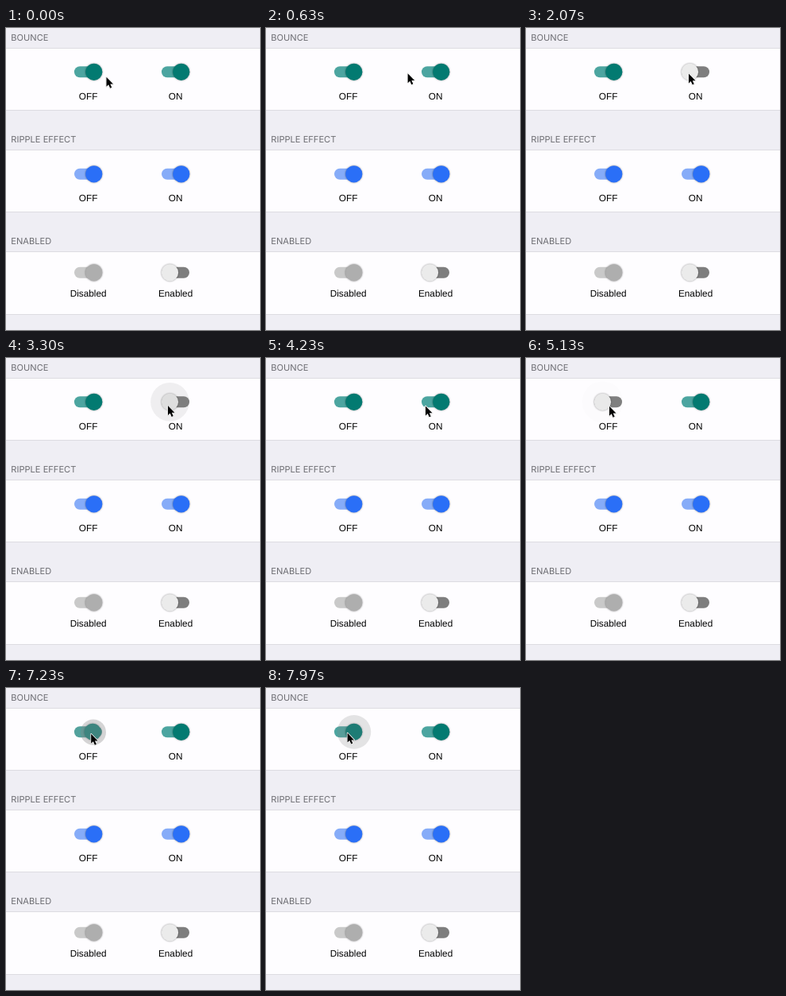
Write an HTML page that moves like this. It is 320 px wide and 380 px high and loops after 8 s.

```html
<!DOCTYPE html>
<html lang="en">
<head>
<meta charset="utf-8">
<title>Switches</title>
<style>
  html, body { margin: 0; width: 100%; height: 100%; overflow: hidden; background: #efeef4; }
  svg { display: block; width: 320px; height: 380px; }
  text { text-rendering: geometricPrecision; }
  .panel { fill: #fefdff; stroke: #dddce1; }
  .head { font: 11.1px Inter, "Liberation Sans", sans-serif; fill: #6d6d72; }
  .label { font: 11.8px "Liberation Sans", Arial, sans-serif; text-anchor: middle; fill: #000; }
  .thumb { filter: drop-shadow(.4px .9px 1.1px rgba(0, 0, 0, .42)); }
  .ripple { fill: #808080; opacity: 0; }
  #cursor path { stroke: #fff; stroke-width: 1.6; stroke-linejoin: round; paint-order: stroke; }
  #cursor { filter: drop-shadow(0 .6px .6px rgba(0, 0, 0, .3)); }
</style>
</head>
<body>
<svg id="stage" viewBox="0 0 320 380">
  <g id="sections"></g>
  <g id="cursor"><path d="M0 0V12L2.7 9.5L4.7 13.9L6.7 13L4.8 8.8H8.5Z"/></g>
</svg>
<script>
const LOOP = 8000;
const OFF_X = 10.5, ON_X = 24.8, RADIUS = 10.6;
const RIPPLE_MS = 400, SLIDE_MS = 150, BOUNCE_MS = 150, BOUNCE_PX = 3;

// Each theme: thumb and track colours
const teal = { thumb: [3, 122, 113], track: [76, 165, 160] };
const blue = { thumb: [42, 111, 247], track: [134, 172, 248] };
const pale = { thumb: [174, 174, 174], track: [201, 201, 201] };
const grey = { thumb: [235, 235, 235], track: [126, 126, 126] };

const sections = [
  { title: 'BOUNCE', top: 25, bottom: 103, y: 55.3, textY: 90, theme: teal, labels: ['OFF', 'ON'] },
  { title: 'RIPPLE EFFECT', top: 153, bottom: 231, y: 183.8, textY: 218.2, theme: blue, labels: ['OFF', 'ON'] },
  { title: 'ENABLED', top: 281, bottom: 360, y: 307.8, textY: 338.3, theme: pale, labels: ['Disabled', 'Enabled'] }
];

// at: touch time, to: new state, wait: delay before the thumb slides
const plain = { x: 86, on: 1, bounce: 0, presses: [
  { at: 4750, to: 0, wait: 70 },
  { at: 6220, to: 1, wait: 15 },
  { at: 7140, to: 0, wait: 60 },
  { at: 7770, to: 1, wait: 30 }
] };
const bouncy = { x: 196, on: 1, bounce: BOUNCE_PX, presses: [
  { at: 1290, to: 0, wait: 60 },
  { at: 3010, to: 0, wait: 0 },
  { at: 3550, to: 1, wait: 40 }
] };

// Cursor tip: time, x, y
const path = [
  [0, 126.5, 61.8], [190, 126.5, 61.8], [1000, 218.5, 53.9], [1030, 219.5, 53.2],
  [1300, 219.5, 53.2], [1700, 205.3, 57.4], [2070, 205, 57.4], [2430, 204, 60],
  [3570, 204, 60], [3930, 214, 59], [4200, 214, 59], [4230, 201, 60.4],
  [4430, 110.8, 58.4], [4540, 110.8, 58.4], [4570, 111.5, 57.8], [4770, 111.5, 57.8],
  [5530, 97.4, 64.3], [6230, 97.4, 64.3], [6930, 107.2, 57.8], [7230, 107.2, 57.8],
  [7530, 102.6, 56.6], [LOOP, 102.6, 56.6]
];

const clamp = v => Math.min(1, Math.max(0, v));
const lerp = (a, b, k) => a + (b - a) * k;
const smooth = k => k * k * (3 - 2 * k);
const easeOut = k => 1 - Math.pow(1 - k, 1.7);
const rgb = c => `rgb(${c})`;
const mix = (a, b, k) => rgb(a.map((v, i) => Math.round(lerp(v, b[i], k))));

function switchMarkup(x, y, theme, on, id) {
  const c = on ? theme : grey;
  return `<g ${id ? `id="${id}"` : ''}>
    <rect class="track" x="${x}" y="${y - 7}" width="35" height="14" rx="7" fill="${rgb(c.track)}"/>
    <circle class="thumb" cx="${x + (on ? ON_X : OFF_X)}" cy="${y}" r="${RADIUS}" fill="${rgb(c.thumb)}"/>
    ${id ? '<circle class="ripple" r="0"/>' : ''}</g>`;
}

document.getElementById('sections').innerHTML = sections.map((s, row) => {
  const switches = [86, 196].map((x, col) =>
    switchMarkup(x, s.y, s.theme, !(row === 2 && col), row ? '' : ['plain', 'bouncy'][col]) +
    `<text class="label" x="${x + 17.6}" y="${s.textY}">${s.labels[col]}</text>`);
  return `<rect class="panel" x="-2" y="${s.top + .5}" width="324" height="${s.bottom - s.top}"/>
    <text class="head" x="6.3" y="${s.top - 8.8}">${s.title}</text>${switches.join('')}`;
}).join('');

for (const [id, sw] of Object.entries({ plain, bouncy })) {
  for (const part of ['track', 'thumb', 'ripple'])
    sw[part] = document.querySelector(`#${id} .${part}`);
}
const cursor = document.getElementById('cursor');

function drawSwitch(sw, t) {
  let state = sw.on, from = sw.on, press = null;
  for (const p of sw.presses) {
    if (t < p.at) break;
    from = state;
    state = p.to;
    press = p;
  }
  let k = state, shift = 0, age = 1;
  if (press) {
    const slide = t - press.at - press.wait;
    const go = smooth(clamp(slide / SLIDE_MS));
    k = lerp(from, state, go);
    const back = smooth(clamp((slide - SLIDE_MS) / BOUNCE_MS));
    shift = (state - from) * sw.bounce * go * (1 - back);
    age = clamp((t - press.at) / RIPPLE_MS);
  }
  const cx = sw.x + lerp(OFF_X, ON_X, k) + shift;
  sw.thumb.setAttribute('cx', cx);
  sw.thumb.setAttribute('fill', mix(grey.thumb, teal.thumb, k));
  sw.track.setAttribute('fill', mix(grey.track, teal.track, k));

  // The ripple starts slightly off centre and settles as it grows
  const lean = Math.pow(1 - age, 4);
  sw.ripple.setAttribute('cx', cx + 2 * lean);
  sw.ripple.setAttribute('cy', sections[0].y + lean);
  sw.ripple.setAttribute('r', lerp(RADIUS, 26, easeOut(age)));
  sw.ripple.style.opacity = .43 * (1 - age);
}

function drawCursor(t) {
  const i = path.findIndex(p => p[0] > t);
  const a = path[i - 1], b = path[i];
  const k = smooth((t - a[0]) / (b[0] - a[0]));
  cursor.setAttribute('transform', `translate(${lerp(a[1], b[1], k)} ${lerp(a[2], b[2], k)})`);
}

const start = performance.now();
function frame() {
  const t = (performance.now() - start) % LOOP;
  drawSwitch(plain, t);
  drawSwitch(bouncy, t);
  drawCursor(t);
  requestAnimationFrame(frame);
}
frame();
</script>
</body>
</html>
```
